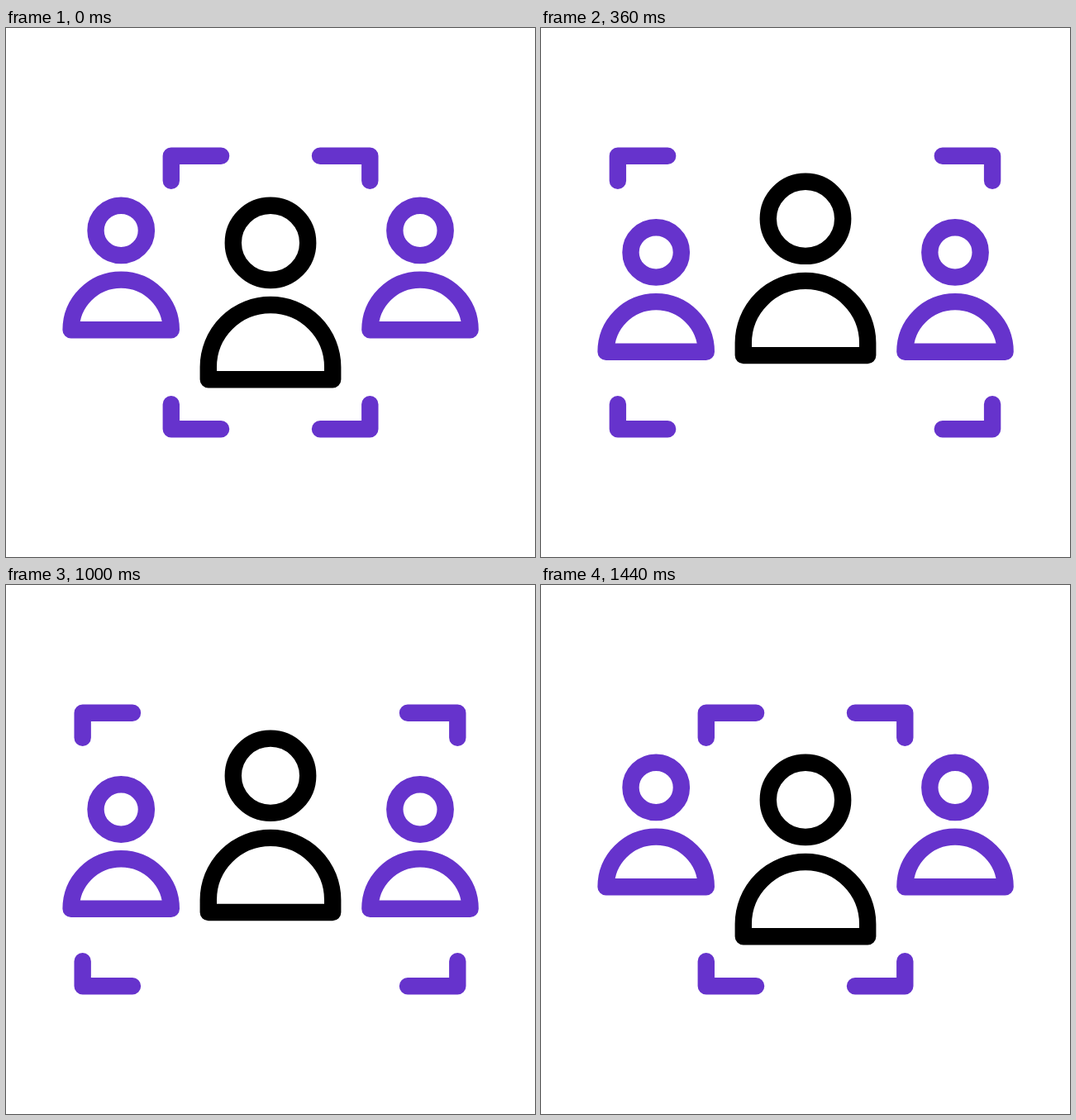
These frames come from a looping animation (640x640 px, 1.48 s). An HTML page with a canvas:

```html
<!DOCTYPE html>
<html lang="en">
<head>
<meta charset="utf-8">
<title>Group focus</title>
<style>
  html, body { margin: 0; width: 100%; height: 100%; overflow: hidden; background: #fff; }
  canvas { display: block; width: 640px; height: 640px; }
</style>
</head>
<body>
<canvas id="stage" width="640" height="640"></canvas>
<script>
const ctx = document.getElementById('stage').getContext('2d');
const PURPLE = '#6633cc', BLACK = '#000';
const STEP = 40, LOOP = 1480;
const BAR = 117;

const clamp = v => Math.min(1, Math.max(0, v));
const smooth = v => v * v * (3 - 2 * v);
const ramp = (n, from, to) => clamp((n - from) / (to - from));

// Ease with horizontal handles at x1 and x2, solved by bisection.
function ease(x, x1, x2) {
  let lo = 0, hi = 1;
  for (let i = 0; i < 24; i++) {
    const s = (lo + hi) / 2, r = 1 - s;
    const at = 3 * r * r * s * x1 + 3 * r * s * s * x2 + s * s * s;
    if (at < x) lo = s; else hi = s;
  }
  return smooth((lo + hi) / 2);
}

function line(color, points) {
  ctx.strokeStyle = color;
  ctx.beginPath();
  points.forEach(([x, y]) => ctx.lineTo(x, y));
  ctx.stroke();
}

function person(color, x, headY, rx, ry, shoulderY, radius, baseY) {
  ctx.strokeStyle = color;
  ctx.beginPath();
  ctx.ellipse(x, headY, rx, ry, 0, 0, Math.PI * 2);
  ctx.stroke();
  ctx.beginPath();
  ctx.moveTo(x - radius, baseY);
  ctx.arc(x, shoulderY, radius, Math.PI, 0);
  ctx.lineTo(x + radius, baseY);
  ctx.closePath();
  ctx.stroke();
}

function corners(x, dir) {
  for (const [y, dy] of [[154.8, 30], [485.2, -30]]) {
    line(PURPLE, [[x, y + dy], [x, y], [x + 60.3 * dir, y]]);
  }
}

function draw(time) {
  const n = Math.floor(time % LOOP / STEP);
  const spread = n < 23 ? smooth(ramp(n, 3, 10)) : 1 - ease(ramp(n, 23, 36), 0.42, 0.4);
  const bar = BAR * (n < 19 ? smooth(ramp(n, 10, 19)) : 1 - smooth(ramp(n, 19, 23)));

  ctx.fillStyle = '#fff';
  ctx.fillRect(0, 0, 640, 640);
  ctx.lineWidth = 20.4;
  ctx.lineCap = ctx.lineJoin = 'round';

  corners(199.8 - 113.2 * spread, 1);
  corners(440.3 + 112 * spread, -1);

  const drop = 28.1 * spread, rise = 30.8 * spread;
  for (const x of [139.2, 501]) {
    person(PURPLE, x, 244.9 + drop, 30.7, 30.2, 365.2 + drop, 60.6, 365.2 + drop);
  }
  person(BLACK, 320, 259.9 - rise, 45.2, 45.1, 410.2 - rise, 75.2, 425.2 - rise);

  if (bar > 0) {
    for (const [color, x] of [[PURPLE, 81], [BLACK, 261.4], [PURPLE, 443.2]]) {
      line(color, [[x, 424.2], [x + bar, 424.2]]);
    }
  }
}

const start = performance.now();
function tick() {
  draw(performance.now() - start);
  requestAnimationFrame(tick);
}
tick();
</script>
</body>
</html>
```
